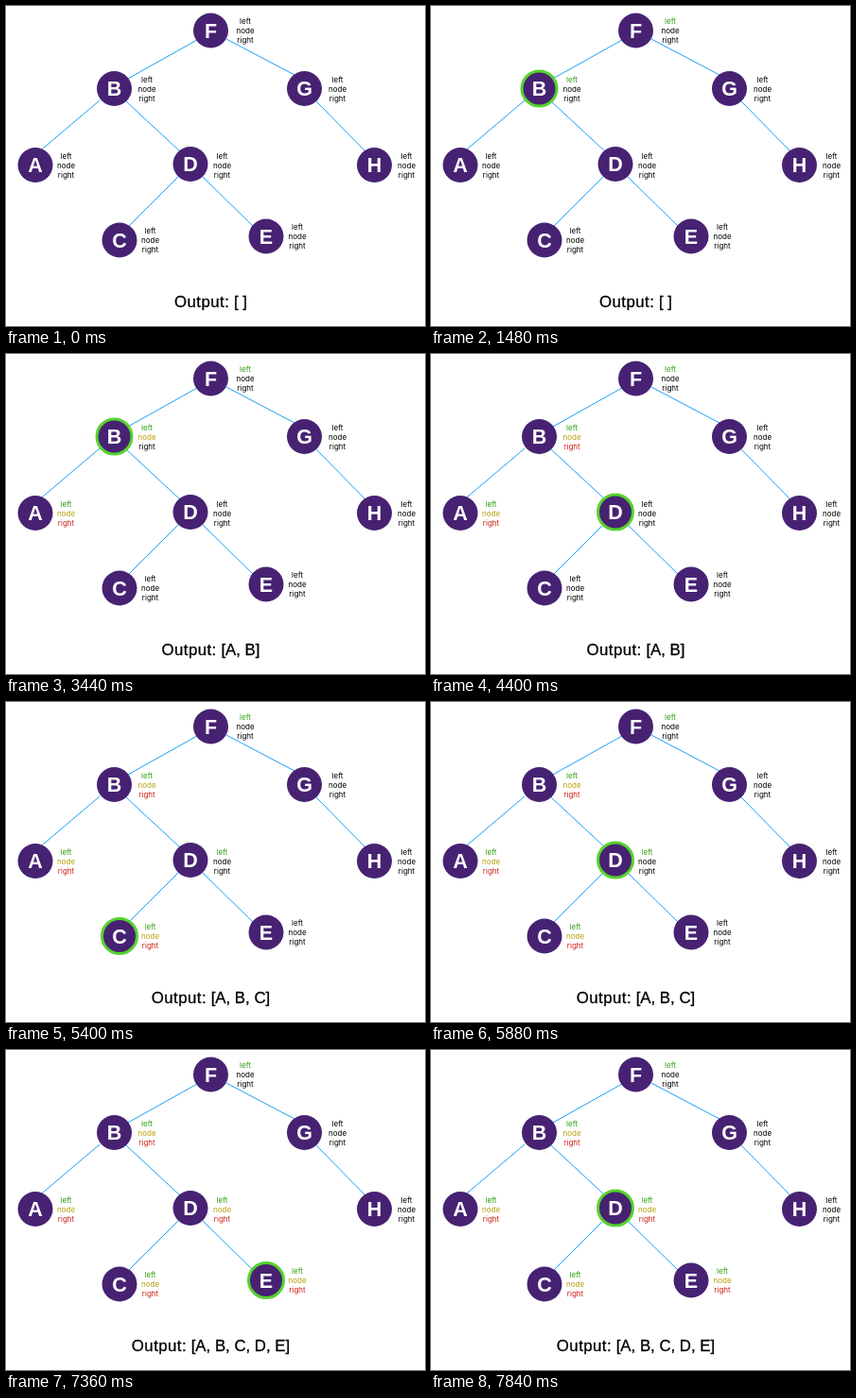
Animation of 443x339 px, one loop 8000 ms. Source, as an HTML page:

```html
<!DOCTYPE html>
<html lang="en">
<head>
<meta charset="utf-8">
<title>In-order traversal</title>
<style>
  html, body { margin: 0; width: 100%; height: 100%; overflow: hidden; background: #fff; }
  svg { display: block; width: 100%; height: 100%; }
  text { text-anchor: middle; }
  .edge { stroke: #18a0fb; stroke-width: 1; }
  .disc { fill: #472272; }
  .letter { font: bold 21.5px "Liberation Sans", Arial, sans-serif; fill: #fff; }
  .label { font: 8px Inter, Arial, sans-serif; }
  .ring { fill: none; stroke: #56d22f; stroke-width: 3; }
  .output { font: 16.8px "Liberation Sans", Arial, sans-serif; stroke: #000; stroke-width: .3; }
  .output tspan:first-child { letter-spacing: .45px; }
</style>
</head>
<body>
<svg id="stage" viewBox="0 0 443 339"></svg>
<script>
const LOOP = 8000;
const WORDS = ["left", "node", "right"];
const COLORS = ["#2d9f10", "#b8a00c", "#cb2014"];

// Circle centre, then label centre and first label baseline
const nodes = {
  F: [216.5, 26, 253, 18.7],
  B: [114.5, 87.5, 149, 80.7],
  G: [315.5, 87.5, 350.5, 80.7],
  A: [31, 168.5, 63.5, 161.7],
  D: [195, 167.5, 228.5, 161.7],
  H: [389.5, 168.5, 423.5, 161.7],
  C: [120, 248, 152.5, 241.2],
  E: [275, 244, 308, 237.2]
};

const edges = [
  [202, 36, 127, 78], [233, 35, 305, 73], [99, 100, 36, 153.5], [127, 101, 185, 155],
  [182, 181, 128, 235], [208, 181, 264, 236], [328, 101, 381, 155]
];

// Each step: start time, ringed node, and optionally a node with its count of lit words
const steps = [
  [520, "", "F", 1],
  [1000, "B"],
  [1480, "B", "B", 1],
  [1960, "A"],
  [2440, "A", "A", 3],
  [2960, "B"],
  [3440, "B", "B", 2],
  [3920, "B", "B", 3],
  [4400, "D"],
  [4920, "D", "D", 1],
  [5400, "C", "C", 3],
  [5880, "D"],
  [6360, "D", "D", 2],
  [6880, "D", "D", 3],
  [7360, "E", "E", 3],
  [7840, "D"]
];

const stage = document.getElementById("stage");

function add(tag, attrs, text = "", parent = stage) {
  const el = document.createElementNS("http://www.w3.org/2000/svg", tag);
  for (const key in attrs) el.setAttribute(key, attrs[key]);
  el.textContent = text;
  return parent.appendChild(el);
}

for (const [x1, y1, x2, y2] of edges) add("line", { class: "edge", x1, y1, x2, y2 });

const labels = {};
for (const name in nodes) {
  const [cx, cy, x, y] = nodes[name];
  add("circle", { class: "disc", cx, cy, r: 18.5 });
  add("text", { class: "letter", x: cx, y: cy + 7.6 }, name);
  labels[name] = WORDS.map((word, i) => add("text", { class: "label", x, y: y + i * 9.9 }, word));
}

const ring = add("circle", { class: "ring", r: 18.5 });
const output = add("text", { class: "output", x: 216.5, y: 319 });
add("tspan", {}, "Output:", output);
const list = add("tspan", {}, "", output);

function draw(time) {
  const lit = {};
  const visited = [];
  let current = "";
  for (const [start, ringed, name, count] of steps) {
    if (time < start) break;
    current = ringed;
    if (!name) continue;
    lit[name] = count;
    if (count > 1 && !visited.includes(name)) visited.push(name);
  }

  for (const name in labels) {
    labels[name].forEach((el, i) => el.setAttribute("fill", i < (lit[name] || 0) ? COLORS[i] : "#000"));
  }
  ring.setAttribute("visibility", current ? "visible" : "hidden");
  if (current) {
    ring.setAttribute("cx", nodes[current][0]);
    ring.setAttribute("cy", nodes[current][1]);
  }
  list.textContent = ` [${visited.join(", ") || " "}]`;
}

const origin = performance.now();
function tick() {
  draw((performance.now() - origin) % LOOP);
  requestAnimationFrame(tick);
}
tick();
</script>
</body>
</html>
```
